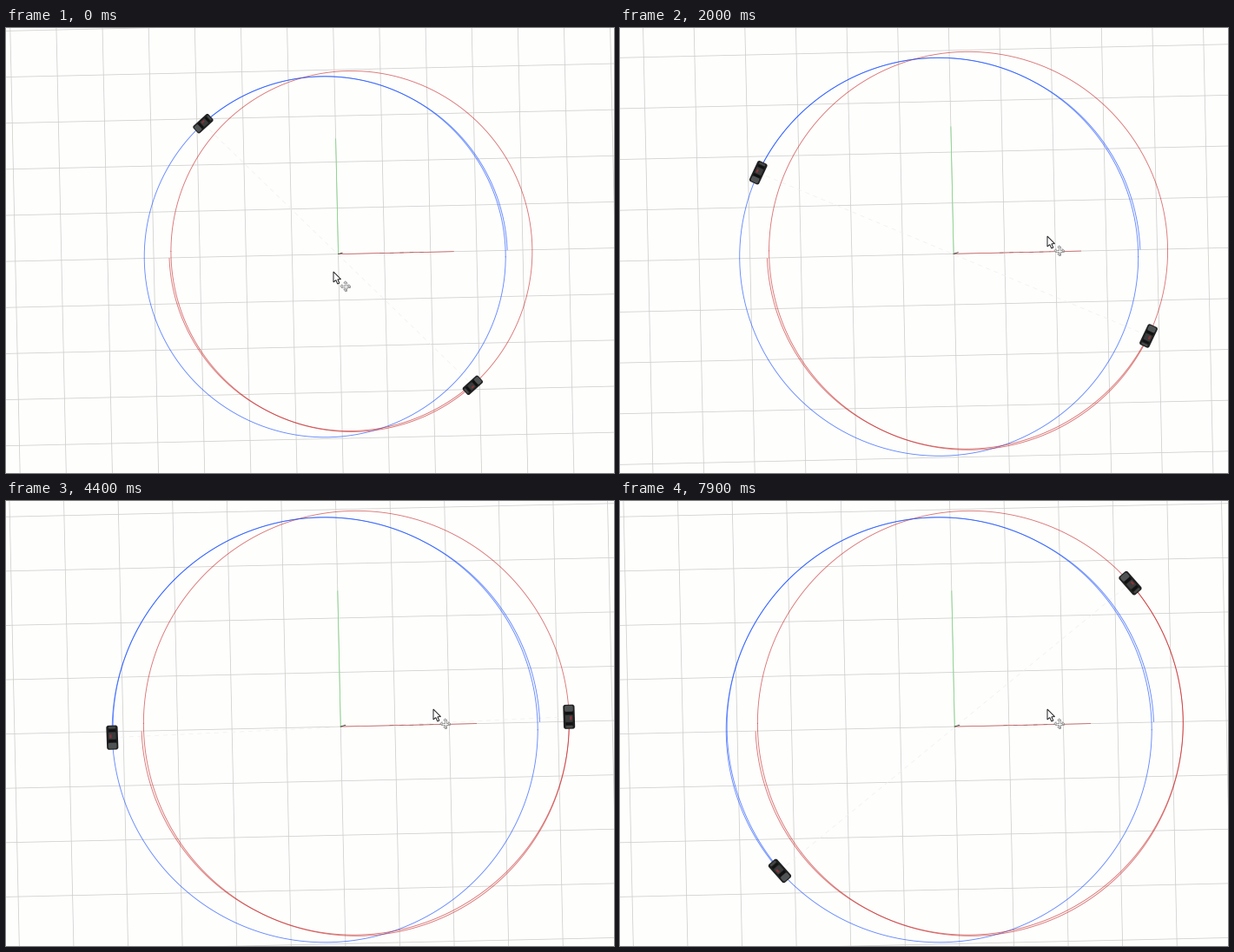
These frames come from a looping animation (700 by 513 pixels, 8 s). A matplotlib script:

```python
import numpy as np
import matplotlib.pyplot as plt
from matplotlib.animation import FuncAnimation
from matplotlib.patches import FancyBboxPatch, Polygon
from matplotlib.transforms import Affine2D

W, H, DPI = 700, 513, 100
FRAMES, STEP = 80, 100
PX = 72 / DPI

# World units: track radius = 1, blue track centred at (0, 0), y down.
CENTER = (367.2, 263.8)
ORIGIN = np.array([0.0738, -0.0152])
UNIT = 1 / 3.915
TILT = np.radians(1.27)
EX = np.array([np.cos(TILT), -np.sin(TILT)])
EY = np.array([np.sin(TILT), np.cos(TILT)])
BLUE_C, RED_C = np.zeros(2), 2 * ORIGIN
START = 2.2

fig = plt.figure(figsize=(W / DPI, H / DPI), dpi=DPI, facecolor="#fefefd")
ax = fig.add_axes([0, 0, 1, 1])
ax.set_xlim(0, W)
ax.set_ylim(H, 0)
ax.axis("off")

zoom = Affine2D()
world = zoom + ax.transData


def line(p, q, color, width=1.0, **kw):
    return ax.plot([p[0], q[0]], [p[1], q[1]], color=color, lw=width * PX,
                   transform=world, **kw)[0]


def on_track(center, deg, radius=1.0):
    a = np.radians(deg)
    return center[0] + radius * np.cos(a), center[1] - radius * np.sin(a)


def draw_grid():
    for k in range(-11, 12):
        for along, across in ((EX, EY), (EY, EX)):
            mid = ORIGIN + k * UNIT * across
            line(mid - 3 * along, mid + 3 * along, "#cfcfcc", 0.8, zorder=1)


def draw_axes():
    tip = ORIGIN + 2.5 * UNIT * EX
    line(ORIGIN, tip, "#c85050", 0.7, zorder=3)
    line(ORIGIN + 0.9 * UNIT * EX, ORIGIN + 1.9 * UNIT * EX, "#8a6060", 0.5,
         zorder=3, dashes=(9, 14))
    line(ORIGIN, ORIGIN - 2.5 * UNIT * EY, "#7fd680", 0.8, zorder=3)
    line(ORIGIN, ORIGIN + [0.022, -0.007], "#444444", 0.9, zorder=4)


class Car:
    """A vehicle with its trail: one full lap plus a growing second lap.

    Both laps are translucent, so the trail is bold only where they overlap.
    """

    def __init__(self, center, phase, color, alpha, bump):
        self.center, self.phase, self.bump = center, phase, bump
        style = dict(color=color, alpha=alpha, lw=0.9 * PX, transform=world)
        deg = np.linspace(START, 360, 500)
        drift = 0.010 * np.clip(1 - (deg / 62) ** 2, 0, 1)
        ax.plot(*on_track(center, deg + phase, 1 + drift), zorder=5, **style)
        self.trail, = ax.plot([], [], zorder=6, **style)
        self.pose = Affine2D()
        self.draw_body()

    def box(self, x, y, w, h, color, rounding=0.6):
        ax.add_patch(FancyBboxPatch(
            (x, y), w, h, boxstyle=f"round,pad=0,rounding_size={rounding}",
            fc=color, ec="none", transform=self.pose + world, zorder=9))

    def draw_body(self):
        self.box(-14, -6.6, 28, 13.2, "#1f2020", 2.6)
        self.box(6, -4.8, 6.8, 9.6, "#505353", 1.8)
        self.box(2.6, -4.8, 3, 9.6, "#111112", 1)
        self.box(-6, -4.2, 8, 8.4, "#3a3c3c", 1)
        self.box(-3.6, 0.8, 4.2, 2.2, "#8c3237")
        self.box(-9.2, -4.2, 2.4, 8.4, "#121212")
        self.box(-12.8, -4, 2.6, 8, "#454747", 1)

    def place(self, deg):
        lap = np.linspace(0, deg, 400)
        peak, width, depth = self.bump
        radius = 1 - depth * np.exp(-((lap - peak) / width) ** 2)
        self.trail.set_data(*on_track(self.center, lap + self.phase, radius))
        a = np.radians(deg + self.phase)
        x, y = on_track(self.center, deg + self.phase)
        self.pose.clear().scale(1 / 245)
        self.pose.rotate(np.arctan2(-np.cos(a), -np.sin(a))).translate(x, y)
        return x, y


def draw_cursor(move):
    tf = move + ax.transData
    arrow = [(0, 0), (0, 12), (2.8, 9.6), (4.8, 14), (6.8, 13.1),
             (4.9, 8.8), (8.5, 8.6)]
    ax.add_patch(Polygon(arrow, fc="white", ec="#222222", lw=1.0 * PX,
                         transform=tf, zorder=20))
    cx, cy = 13.7, 16.6
    for color, width in (("#8a8a8a", 2.6), ("white", 1.0)):
        for dx, dy in ((4, 0), (0, 4)):
            ax.plot([cx - dx, cx + dx], [cy - dy, cy + dy], color=color,
                    lw=width * PX, transform=tf, zorder=20)
    for dx, dy in ((1, 0), (-1, 0), (0, 1), (0, -1)):
        head = [(cx + 5.8 * dx, cy + 5.8 * dy),
                (cx + 3.6 * dx + 2 * dy, cy + 3.6 * dy + 2 * dx),
                (cx + 3.6 * dx - 2 * dy, cy + 3.6 * dy - 2 * dx)]
        ax.add_patch(Polygon(head, fc="white", ec="#8a8a8a", lw=0.7 * PX,
                             transform=tf, zorder=21))


draw_grid()
draw_axes()
link = line((0, 0), (0, 0), "#f0f0ee", 0.7, zorder=2, dashes=(7, 7))
blue = Car(BLUE_C, 0, "#1a50ff", 0.68, (200, 26, 0.007))
red = Car(RED_C, 180, "#c42020", 0.62, (118, 34, 0.009))
mouse = Affine2D()
draw_cursor(mouse)


def update(i):
    t = i * STEP / 1000
    r = np.interp(t, [0, 1, 2, 3.2, 3.8], [208, 221.5, 229.5, 243, 245])
    zoom.clear().scale(r).translate(*CENTER)

    deg = 132.4 + 11.29 * t
    p, q = blue.place(deg), red.place(deg - 0.3)
    link.set_data([p[0], q[0]], [p[1], q[1]])

    k = min(t / 0.8, 1)
    k = k * k * (3 - 2 * k)
    mouse.clear().translate(377 + 115 * k, 281 - 41 * k)
    return []


anim = FuncAnimation(fig, update, frames=FRAMES, interval=STEP,
                     repeat=True, repeat_delay=0, blit=False)
plt.show()
```
